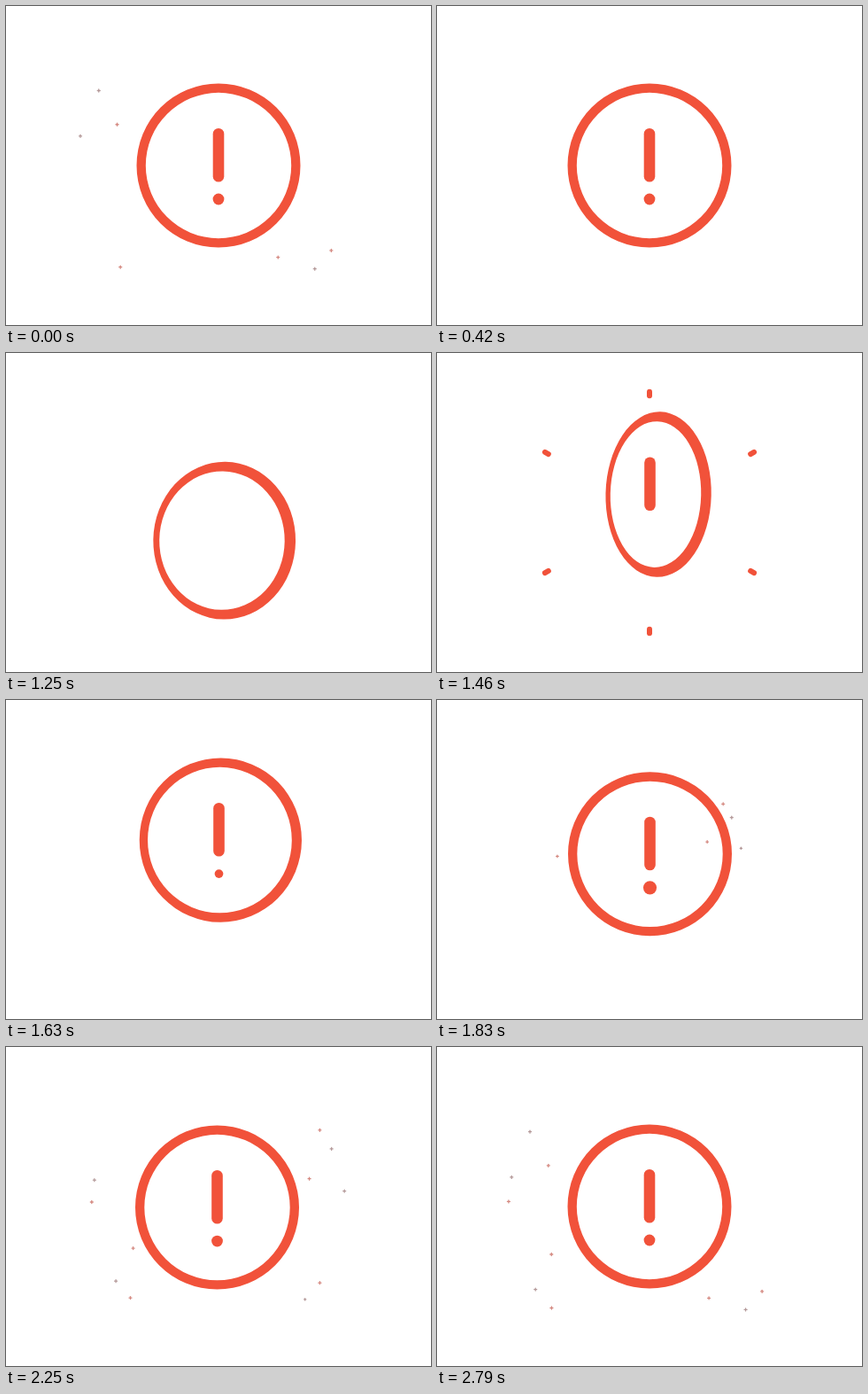
An HTML page with a canvas for the animation above (2830 ms loop, 480 px wide and 360 px high).

```html
<!DOCTYPE html>
<html lang="en">
<head>
<meta charset="utf-8">
<title>Alert</title>
<style>
html, body { margin: 0; width: 100%; height: 100%; overflow: hidden; background: #fff; }
canvas { display: block; }
</style>
</head>
<body>
<canvas id="stage" width="480" height="360"></canvas>
<script>
const ctx = document.getElementById('stage').getContext('2d');
const LOOP = 2830, CUT = 830, TAU = Math.PI * 2, RED = '#f1523a';

const clamp = v => Math.max(0, Math.min(1, v));
const span = (t, a, b) => clamp((t - a) / (b - a));
const mix = (a, b, u) => a + (b - a) * u;
const smooth = u => u * u * (3 - 2 * u);
const polar = (deg, r) => [240 + r * Math.cos(deg * TAU / 360), 180 + r * Math.sin(deg * TAU / 360)];

// Fans of specks, 10 degrees apart; gap delays each next one
const fans = [
  { angle: -37, count: 4, born: 1760, end: 2740, gap: 10 },
  { angle: 37, count: 3, born: 2150, end: 3000, gap: 60 },
  { angle: 134, count: 3, born: 2150, end: 2845, gap: -20 },
  { angle: 182, count: 4, born: 1780, end: 2825, gap: 250 }
];

function line([x1, y1], [x2, y2], width, color) {
  ctx.strokeStyle = color;
  ctx.lineWidth = width;
  ctx.beginPath();
  ctx.moveTo(x1, y1);
  ctx.lineTo(x2, y2);
  ctx.stroke();
}

function centerX(t) {
  return 240.5 - 2 * smooth(span(t, 1830, 2200)) + 1.5 * smooth(span(t, 2300, 2700));
}

// Rise from below, fall back past the rest position, settle
function centerY(t) {
  if (t < 1580) return 157 + 192 * ((1580 - t) / 500) ** 3;
  return mix(157, 181.5, smooth(span(t, 1580, 1980))) - 1.5 * smooth(span(t, 2000, 2700));
}

function drawRing(t, x, y) {
  const turn = Math.PI * (1 - span(t, 1203, 1750)) ** 2;
  const sx = Math.abs(Math.cos(turn)), side = Math.sin(turn);
  const flat = 1 - Math.sin(span(t, 1080, 1300) * Math.PI / 2);
  const radius = 92.5 + side;
  const rx = Math.max(5, radius * sx), ry = radius * (1 - 0.735 * flat);
  const near = 0.8 * Math.max(side, flat);
  const cx = x - 1.5 * flat + 12.5 * side;
  const tilt = 0.03 * side - 0.022 * flat;
  const innerRx = Math.max(0, rx - 5.1 - 5.2 * sx - near * flat);
  ctx.fillStyle = RED;
  ctx.beginPath();
  ctx.ellipse(cx, y, rx, ry, tilt, 0, TAU);
  ctx.closePath();
  ctx.ellipse(cx - 6.3 * side * sx, y, innerRx, ry - 10.3 - near, tilt, 0, TAU);
  ctx.fill('evenodd');
}

function drawMark(t, x, y) {
  const grow = smooth(span(t, 1320, 1440));
  if (grow > 0) {
    const mid = y - 11.8, half = 24 * grow;
    line([x, mid - half], [x, mid + half], 12.6 * grow, RED);
  }
  const pop = smooth(span(t, 1500, 1720));
  ctx.fillStyle = RED;
  ctx.beginPath();
  ctx.arc(x, y + 38, 7.6 * pop - 1.2 * smooth(span(t, 1800, 2150)), 0, TAU);
  ctx.fill();
}

function drawRays(t) {
  const u = span(t, 1330, 1600), size = Math.sin(Math.PI * u);
  if (size < 0.02) return;
  const outer = 141.5 - 31 * (1 - u) ** 4 - 3 * size;
  for (let deg = 30; deg < 390; deg += 60) {
    line(polar(deg, outer - 4.5 * size), polar(deg, outer), 6 * size, RED);
  }
}

function drawSpecks(t) {
  const drift = 75 * (1 - span(t, 1700, 3100)) ** 3;
  for (const { angle, count, born, end, gap } of fans) {
    for (let i = 0; i < count; i++) {
      const from = born + i * gap, to = Math.min(3080, end + i * gap);
      if (t < from || t >= to) continue;
      const reach = i % 3 === 2 ? 124 : 160;
      const [x, y] = polar(angle + i * 10, reach - drift);
      const h = 1.5 * span(t, from - 20, from + 60);
      const color = i % 2 ? '#b59a9a' : '#d58a82';
      line([x - h, y], [x + h, y], 1.3, color);
      line([x, y - h], [x, y + h], 1.3, color);
    }
  }
}

function draw(now) {
  const phase = now % LOOP;
  const t = phase < CUT ? phase + LOOP : phase;
  ctx.fillStyle = '#fff';
  ctx.fillRect(0, 0, 480, 360);
  ctx.lineCap = 'round';
  if (t < 1000) return;
  const x = centerX(t), y = centerY(t);
  drawSpecks(t);
  drawRing(t, x, y);
  drawMark(t, x, y);
  drawRays(t);
}

const start = performance.now();
function tick() {
  draw(performance.now() - start);
  requestAnimationFrame(tick);
}
tick();
</script>
</body>
</html>
```
